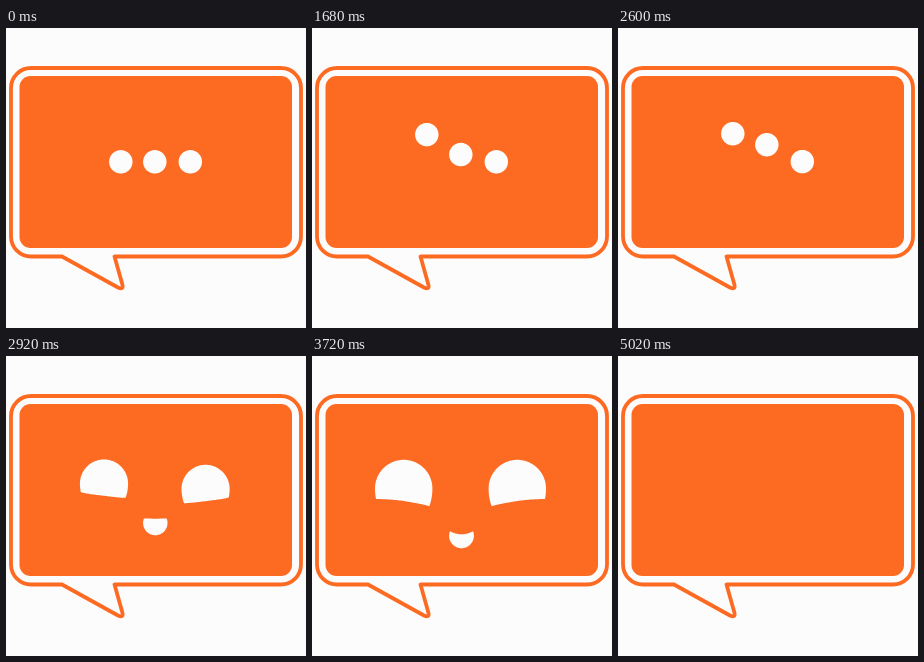
These frames come from a looping animation (300 by 300 pixels, 5040 ms). An HTML page:

```html
<!DOCTYPE html>
<html lang="en">
<head>
<meta charset="utf-8">
<title>Winking chat bubble</title>
<style>
  html, body { margin: 0; width: 100%; height: 100%; overflow: hidden; background: #fcfcfc; }
  svg { display: block; width: 100%; height: 100%; }
</style>
</head>
<body>
<svg viewBox="0 0 300 300">
  <path fill="none" stroke="#fd6b22" stroke-width="3.8" stroke-linejoin="round"
    d="M108.5 228.5H275A20 20 0 0 0 295 208.500V60A20 20 0 0 0 275 40H25A20 20 0 0 0 5 60V208.500A20 20 0 0 0 25 228.500H56L112 259.500Q117.500 262 116.500 257Z"/>
  <rect x="13.500" y="48" width="272.500" height="172" rx="11" fill="#fd6b22"/>
  <g id="face" fill="#fcfcfc">
    <path id="left"/>
    <path id="right"/>
    <path id="mouth"/>
    <path id="wink" d="M196 143C199 127 213 107 236 107C242 107 241 114 236 115C223 118 212 126 207 135C218 131 231 132 240 135C246 137 243 142 238 141C224 138 212 141 201 145C198 146 195 146 196 143Z"/>
  </g>
</svg>
<script>
const LOOP = 5040;
const DOT_Y = 133.8, DOT_R = 11.7;
const WAVES = [620, 1700], STAGGER = 360;
const HOP = { height: 29.2, rise: 220, fall: 720 };
const MIRROR = 297;

const [face, left, right, mouth, wink] =
  ['face', 'left', 'right', 'mouth', 'wink'].map(id => document.getElementById(id));

// Every shape is a ring of points, so any two can be blended.
const ring = point => Array.from({ length: 120 }, (_, i) => {
  const a = i / 60 * Math.PI;
  return point(Math.cos(a), Math.sin(a));
});
const dot = (x, y) => ring((c, s) => [x + DOT_R * c, y + DOT_R * s]);
const mirror = pts => pts.map(([x, y]) => [MIRROR - x, y]);
const blend = (a, b, k) => a.map(([x, y], i) => [x + (b[i][0] - x) * k, y + (b[i][1] - y) * k]);
const show = (path, pts) => path.setAttribute('d', `M${pts.join('L')}Z`);

// A dome cut off along a sloping lower lid
const EYE = ring((c, s) => [
  91.7 + 28.7 * c,
  Math.min(132.5 + (s > 0 ? 40 : 28.7) * s, 143 + 2 * (c + 1) ** 2)
]);
// A disc cut off along a sagging upper lip
const SMILE = ring((c, s) => [149.5 + 12.4 * c, Math.max(179.8 + 12.4 * s, 178.3 - 3.5 * c * c)]);

const ease = (t, from, to) => {
  const u = Math.min(1, Math.max(0, (t - from) / (to - from)));
  return u * u * (3 - 2 * u);
};

// Quick rise, then a slow soft fall
function hop(t) {
  const { height, rise, fall } = HOP;
  if (t <= 0 || t >= rise + fall) return 0;
  return t < rise
    ? height * Math.sin(t / rise * Math.PI / 2)
    : height * (1 + Math.cos((t - rise) / fall * Math.PI)) / 2;
}

function draw(t) {
  const morph = ease(t, 2770, 3000) - ease(t, 4280, 4660);
  const blink = ease(t, 3020, 3120) - ease(t, 3190, 3300);
  const dotY = order =>
    DOT_Y - Math.max(...WAVES.map(start => hop(t - start - order * STAGGER)));

  show(left, blend(dot(114.8, dotY(2)), EYE, morph));
  show(mouth, blend(dot(148.8, dotY(1)), SMILE, morph));
  show(right, mirror(blend(dot(MIRROR - 184.3, dotY(0)), EYE, morph)));

  mouth.setAttribute('transform', `translate(${-7.7 * blink} ${4 * blink}) rotate(${7 * blink} 149.5 184)`);
  right.setAttribute('transform', `translate(0 ${134 * blink}) scale(1 ${1 - blink})`);
  const closed = blink > 0.6;
  right.style.display = closed ? 'none' : '';
  wink.style.display = closed ? '' : 'none';
  face.style.display = t >= 5020 ? 'none' : '';
}

const start = performance.now();
function tick() {
  draw((performance.now() - start) % LOOP);
  requestAnimationFrame(tick);
}
tick();
</script>
</body>
</html>
```
